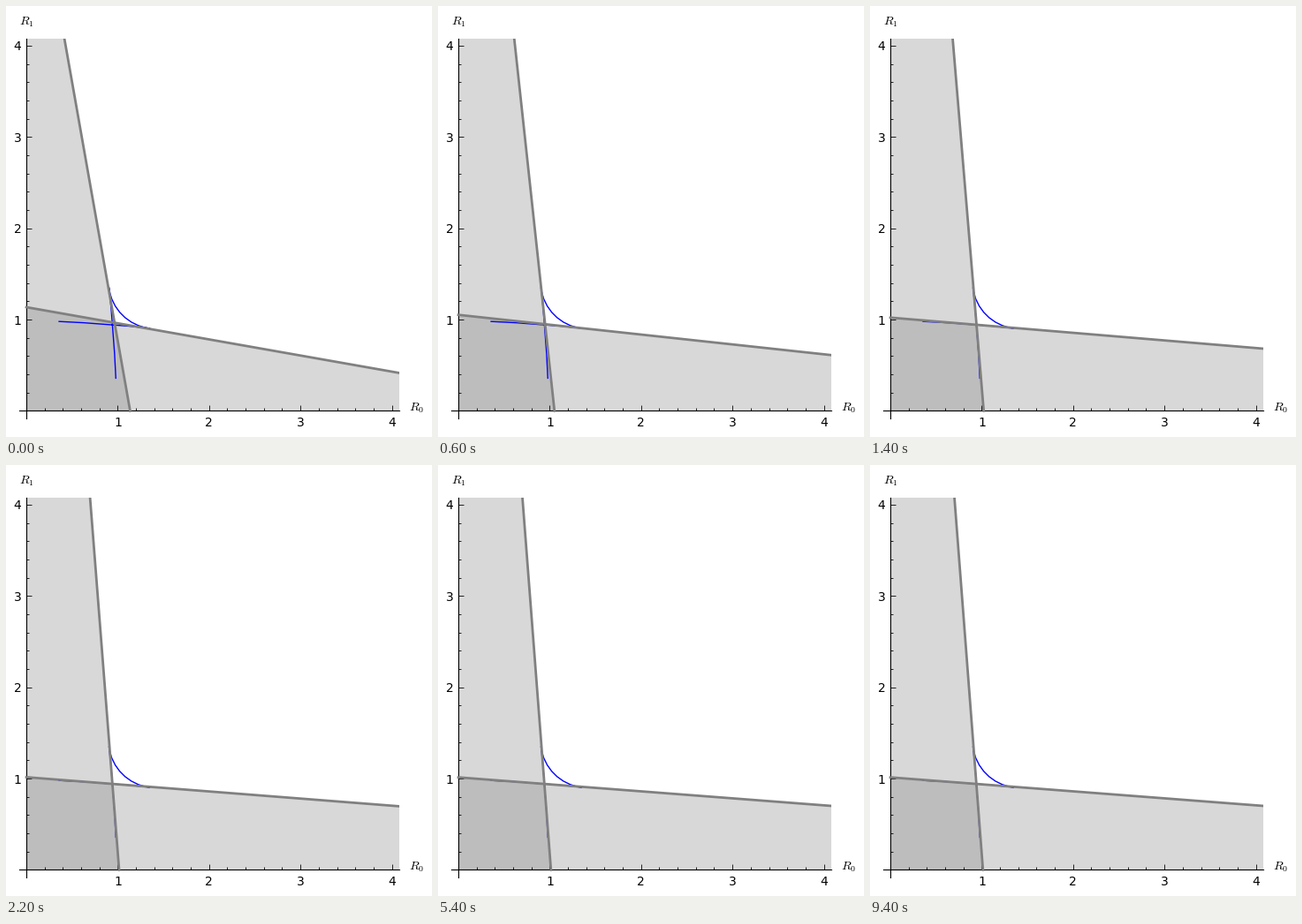
These frames come from a looping animation (482x488 px, 9.8 s). A matplotlib script:

```python
import matplotlib.pyplot as plt
from matplotlib.animation import FuncAnimation
from matplotlib.patches import PathPatch, Polygon
from matplotlib.path import Path

W, H, DPI = 482, 488, 100
LOW, HIGH = -0.08, 4.08
REACH = 5
FRAMES, STEP_MS = 49, 200

plt.rcParams.update({
    "font.family": "DejaVu Sans",
    "font.size": 10,
    "mathtext.fontset": "cm",
})

fig = plt.figure(figsize=(W / DPI, H / DPI), dpi=DPI, facecolor="white")
ax = fig.add_axes([14.8 / W, 21.33 / H, 430 / W, 430 / H])
ax.set(xlim=(LOW, HIGH), ylim=(LOW, HIGH))
ax.patch.set_visible(False)
ax.set_axisbelow(False)


def style_axes():
    for side in ("top", "right"):
        ax.spines[side].set_visible(False)
    for side in ("left", "bottom"):
        ax.spines[side].set_position("zero")
        ax.spines[side].set_linewidth(0.8)
    for axis in (ax.xaxis, ax.yaxis):
        axis.set_ticks(range(1, 5))
        axis.set_ticks([i / 5 for i in range(1, 20) if i % 5], minor=True)
    ax.tick_params(which="major", direction="in", length=4, width=0.6, pad=4)
    ax.tick_params(which="minor", direction="in", length=2, width=0.6)
    ax.tick_params(axis="x", which="major", pad=4.85)
    fig.text(456 / W, 1 - 459 / H, "$R_0$", ha="left", va="baseline")
    fig.text(23 / W, 1 - 21.5 / H, "$R_1$", ha="center", va="baseline")


def mirror(points):
    """Swap the two coordinates of each point."""
    return [(y, x) for x, y in points]


def add_curve():
    tail = [(0.358, 0.979), (0.918, 0.954), (1.352, 0.904)]
    bend = [(1.117, 0.931)]
    points = tail + bend + mirror(bend) + mirror(tail)[::-1]
    codes = [Path.MOVETO] + [Path.CURVE3] * 2 + [Path.CURVE4] * 3 + [Path.CURVE3] * 2
    ax.add_patch(PathPatch(Path(points, codes), fill=False, edgecolor="blue",
                           linewidth=1, joinstyle="round", capstyle="projecting",
                           zorder=2))


def boundary(step):
    """Intercept and steepness of the line after some iterations."""
    gap = 0.0999 * 0.68 ** step
    return 1.0133 + 1.225 * gap, 0.0766 + gap


style_axes()
add_curve()
regions = [ax.add_patch(Polygon([(0, 0)] * 3, facecolor="0.5", edgecolor="none",
                                alpha=0.3, zorder=1)) for _ in range(2)]
lines = [ax.plot([], [], color="0.5", linewidth=2, zorder=3,
                 solid_capstyle="projecting")[0] for _ in range(2)]


def draw(step):
    b, m = boundary(step)
    edge = [(0, b), (REACH, b - m * REACH)]
    area = [(0, 0)] + edge + [(REACH, 0)]
    for region, line, flip in zip(regions, lines, (list, mirror)):
        region.set_xy(flip(area))
        line.set_data(*zip(*flip(edge)))
    return regions + lines


anim = FuncAnimation(fig, draw, frames=FRAMES, init_func=lambda: draw(0),
                     interval=STEP_MS, repeat=True, repeat_delay=0, blit=False)
plt.show()
```
